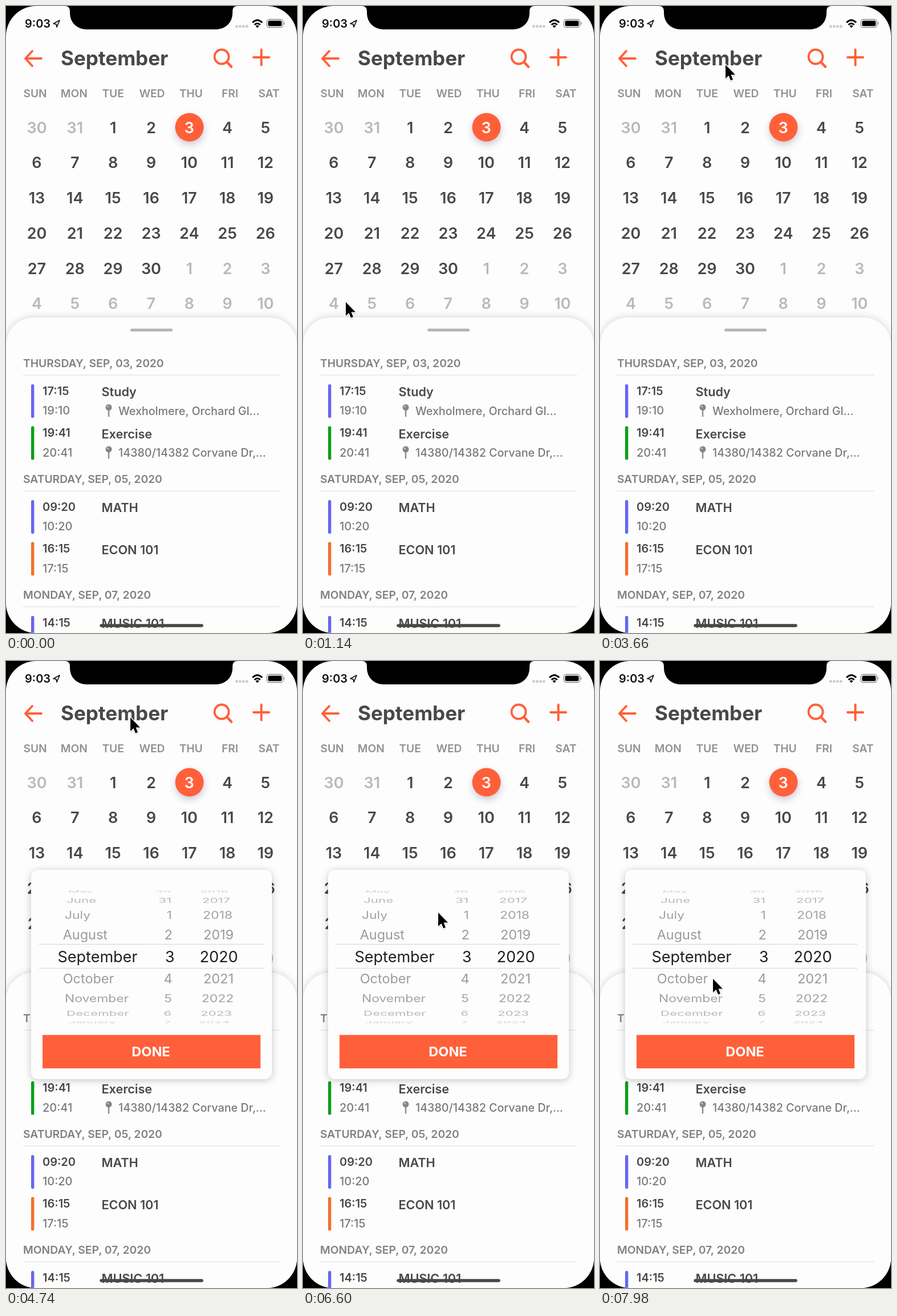
Recreate the animation shown at these times as an HTML page. Size 510 px wide and 1099 px high, loop 8000 ms.

```html
<!DOCTYPE html>
<html lang="en">
<head>
<meta charset="utf-8">
<title>Calendar</title>
<style>
html, body { margin: 0; width: 100%; height: 100%; overflow: hidden; background: #000; }
svg { display: block; width: 510px; height: 1099px; font-family: Inter, Roboto, sans-serif; }
</style>
</head>
<body>
<svg id="stage" viewBox="0 0 510 1099">
  <defs>
    <clipPath id="screen"><rect width="510" height="1099" rx="53"/></clipPath>
    <filter id="soft" x="-30%" y="-30%" width="160%" height="160%"><feGaussianBlur stdDeviation="7"/></filter>
    <filter id="tiny" x="-50%" y="-50%" width="200%" height="200%"><feGaussianBlur stdDeviation="1.5"/></filter>
  </defs>
  <g clip-path="url(#screen)">
    <rect width="510" height="1099" fill="#fdfdfd"/>
    <g id="month"></g>
    <path d="M0 1120V594A48 48 0 0 1 48 546H462A48 48 0 0 1 510 594V1120Z" fill="#000" opacity=".17" filter="url(#soft)"/>
    <path d="M0 1099V594A48 48 0 0 1 48 546H462A48 48 0 0 1 510 594V1099Z" fill="#fdfdfd"/>
    <path d="M220.500 568H289.500" stroke="#b4b4b4" stroke-width="5" stroke-linecap="round"/>
    <g id="agenda"></g>
    <path d="M167 1086H343" stroke="#484848" stroke-width="5.500" stroke-linecap="round"/>
    <g id="picker"></g>
    <g id="cursor">
      <path d="M0 2V26L5.500 21 9 29.500 13 28 9.500 19.500H17Z" opacity=".35" filter="url(#tiny)"/>
      <path d="M0 0V24L5.500 19 9 27.500 13 26 9.500 17.500H17Z" stroke="#fff" stroke-width="3" paint-order="stroke" stroke-linejoin="round"/>
    </g>
    <path d="M103 0Q112 0 112 9V13A28 28 0 0 0 140 41H369A28 28 0 0 0 397 13V9Q397 0 406 0Z"/>
    <g id="status"></g>
  </g>
</svg>
<script>
const $ = id => document.getElementById(id);
const ACCENT = '#ff6039', DARK = '#484848', GRAY = '#7a7a7a';
const text = (x, y, str, size, weight, fill, anchor = 'start', extra = '') =>
  `<text x="${x}" y="${y}" font-size="${size}" font-weight="${weight}" fill="${fill}" text-anchor="${anchor}" ${extra}>${str}</text>`;
const line = (d, color, width) =>
  `<path d="${d}" fill="none" stroke="${color}" stroke-width="${width}" stroke-linecap="round" stroke-linejoin="round"/>`;

function statusBar() {
  let s = text(33, 38, '9:03', 20, 600, '#111');
  s += line('M94 25L83 31 88 31.800 89 37Z', '#111', 1.7);
  for (let i = 0; i < 4; i++) s += `<rect x="${402 + i * 6}" y="33.500" width="4.500" height="4.500" rx="1.200" fill="#ccc"/>`;
  s += '<g fill="none" stroke="#000" stroke-width="3"><path d="M432 29Q440.500 20.500 449 29"/><path d="M435.500 33Q440.500 28 445.500 33"/></g>';
  s += '<path d="M437.500 35Q440.500 32.500 443.500 35L440.500 38.500Z"/>';
  s += '<rect x="457" y="23.500" width="28.500" height="14" rx="4.500" fill="none" stroke="#888" stroke-width="1.300"/>';
  s += '<rect x="459.300" y="25.700" width="24" height="9.600" rx="2.500"/><path d="M487 28Q490 30.500 487 33Z" fill="#888"/>';
  return s;
}

function month() {
  let s = line('M34 92H62M46 79L34 92 46 105', ACCENT, 3.8);
  s += text(96, 104, 'September', 35, 700, DARK);
  s += `<circle cx="378" cy="89" r="12.500" fill="none" stroke="${ACCENT}" stroke-width="3.800"/>`;
  s += line('M387.500 98.500L395 106.500', ACCENT, 4.5) + line('M434 90H461M447.500 76.500V103.500', ACCENT, 4);
  ['SUN', 'MON', 'TUE', 'WED', 'THU', 'FRI', 'SAT'].forEach((d, i) => {
    s += text(51 + i * 68.3, 160, d, 19.2, 600, '#919196', 'middle');
  });
  s += `<circle cx="322" cy="218" r="24" fill="#402060" opacity=".28" filter="url(#soft)"/>`;
  s += `<circle cx="321.500" cy="212.500" r="25" fill="${ACCENT}"/>`;
  for (let i = 0; i < 42; i++) {
    const n = i - 1;
    const day = n < 1 ? n + 31 : n > 30 ? n - 30 : n;
    const fill = n === 3 ? '#fff' : n < 1 || n > 30 ? '#b9b9b9' : DARK;
    s += text(54 + i % 7 * 66.8, 222.7 + Math.floor(i / 7) * 61.7, day, 27, 600, fill, 'middle');
  }
  return s;
}

function agenda() {
  const blue = '#6666f2', green = '#0c9f18', orange = '#f27030';
  const days = [
    [633, 'THURSDAY, SEP, 03, 2020'],
    [836, 'SATURDAY, SEP, 05, 2020'],
    [1039, 'MONDAY, SEP, 07, 2020']];
  const events = [
    [663, blue, '17:15', '19:10', 'Study', 'Wexholmere, Orchard Gl...'],
    [736.5, green, '19:41', '20:41', 'Exercise', '14380/14382 Corvane Dr,...'],
    [866, blue, '09:20', '10:20', 'MATH'],
    [939.5, orange, '16:15', '17:15', 'ECON 101'],
    [1069, blue, '14:15', '15:15', 'MUSIC 101']];
  let s = '';
  for (const [y, label] of days)
    s += text(30, y, label, 19.3, 600, '#818181') + line(`M30 ${y + 14}H480`, '#e7e7ee', 1.3);
  for (const [y, color, start, end, title, place] of events) {
    s += `<rect x="44" y="${y}" width="5.400" height="59" rx="2.500" fill="${color}"/>`;
    s += text(64, y + 18.7, start, 20, 600, DARK) + text(64, y + 53.3, end, 20, 500, GRAY);
    s += text(167.5, y + 21, title, 21.6, 600, DARK);
    if (place) {
      s += line(`M180 ${y + 41}V${y + 56}`, '#8c8c8c', 2.4);
      s += `<circle cx="180" cy="${y + 40.500}" r="5.500" fill="#858585"/><circle cx="178.500" cy="${y + 39}" r="1.800" fill="#bbb"/>`;
      s += text(197, y + 53.5, place, 19.7, 500, GRAY);
    }
  }
  return s;
}

function picker() {
  const months = ['May', 'June', 'July', 'August', 'September', 'October', 'November', 'December', 'January'];
  const days = [30, 31, 1, 2, 3, 4, 5, 6, 7];
  const fills = ['#202020', '#9a9a9a', '#a2a2a2', '#b9b9b9', '#d2d2d2'];
  let s = '<rect x="44" y="368" width="422" height="367" rx="12" opacity=".22" filter="url(#soft)"/>';
  s += '<rect x="44" y="366" width="422" height="367" rx="12" fill="#fdfdfd"/>';
  s += line('M58 496.500H451M58 538.500H451', '#d3d3d3', 1.2);
  // Each row sits on a drum turned by 19 degrees per step.
  months.forEach((name, i) => {
    const k = Math.abs(i - 4), angle = (i - 4) * 19 * Math.PI / 180;
    const size = k ? 24 - .55 * k : 27, base = size * .364;
    const put = (x, str, anchor) => text(x, base, str, size, 400, fills[k], anchor);
    s += `<g transform="translate(0 ${518.5 + 118 * Math.sin(angle)}) scale(1 ${Math.cos(angle)})">`;
    s += put(k ? 96.5 + 3.2 * k : 90.5, name) + put(k ? 292.5 - .8 * k : 295.5, days[i], 'end');
    s += put(373 - .5 * k * k, 2016 + i, 'middle') + '</g>';
  });
  s += `<rect x="64" y="655.500" width="382" height="58.500" fill="${ACCENT}"/>`;
  return s + text(254, 693, 'DONE', 23.5, 700, '#fff', 'middle');
}

$('status').innerHTML = statusBar();
$('month').innerHTML = month();
$('agenda').innerHTML = agenda();
$('picker').innerHTML = picker();

// Pointer stops: time, x, y
const stops = [
  [840, -30, 600], [1140, 75, 519], [2260, 207, 151], [2900, 220, 103], [3660, 220, 103],
  [4740, 218, 99], [5000, 218, 99], [5900, 240, 432], [6600, 237, 441], [7980, 198, 557]];
const clamp = v => Math.max(0, Math.min(1, v));
const ease = v => v * v * (3 - 2 * v);

function pointer(t) {
  const i = Math.max(1, stops.findIndex(p => p[0] >= t));
  const [a, b] = t > 7980 ? stops.slice(-2) : [stops[i - 1], stops[i]];
  const u = ease(clamp((t - a[0]) / (b[0] - a[0])));
  return [a[1] + (b[1] - a[1]) * u, a[2] + (b[2] - a[2]) * u];
}

function draw() {
  const t = performance.now() % 8000;
  $('cursor').setAttribute('transform', `translate(${pointer(t)})`);
  $('picker').setAttribute('opacity', ease(clamp((t - 4060) / 300)));
  requestAnimationFrame(draw);
}
draw();
</script>
</body>
</html>
```
